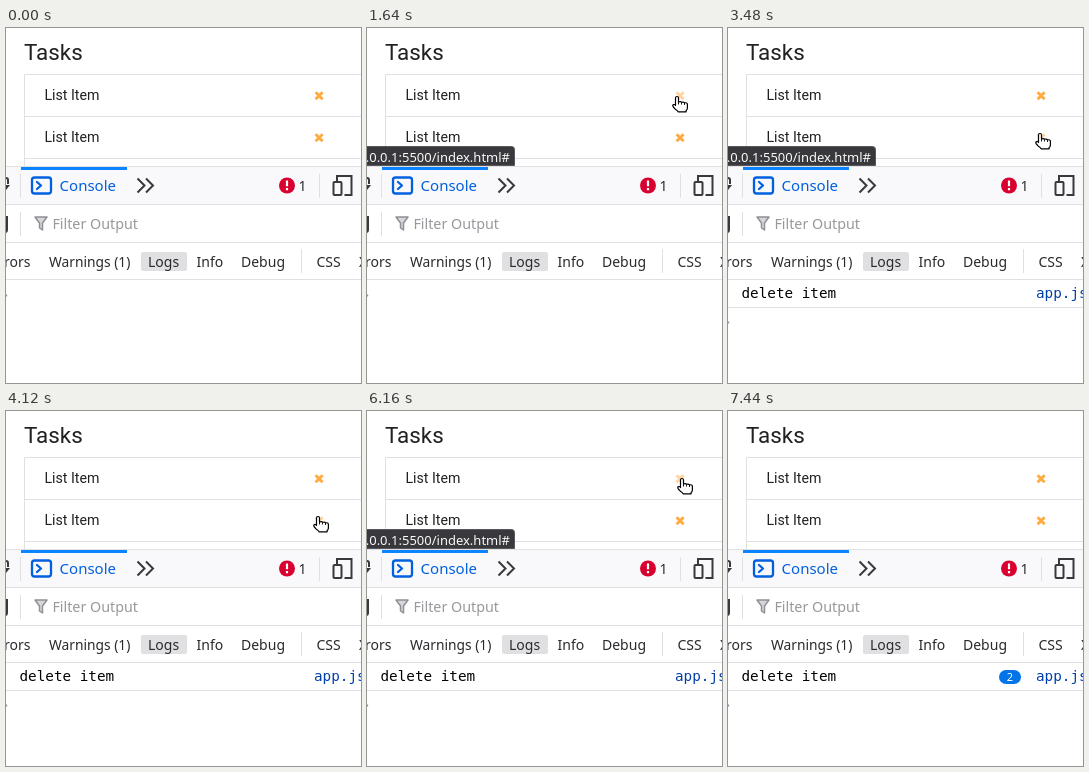
An HTML page for the animation above (7.88 s loop, 355 by 355 pixels).

```html
<!DOCTYPE html>
<html lang="en">
<head>
<meta charset="utf-8">
<title>Task list and console</title>
<style>
html, body { margin: 0; width: 100%; height: 100%; overflow: hidden; background: #fff; }
svg { display: block; width: 355px; height: 355px; }
text { white-space: pre; }
.page { font: 14.2px Roboto, sans-serif; fill: #212121; }
.ui { font: 14px "Noto Sans", sans-serif; fill: #2a2a2e; }
.mono { font: 14.3px "DejaVu Sans Mono", monospace; }
.line { stroke: #e0e0e2; fill: none; }
.icon { stroke: #38383d; stroke-width: 2; fill: none; }
.cross { stroke: #ffab40; stroke-width: 2.9; }
</style>
</head>
<body>
<svg viewBox="0 0 355 355">
  <g class="page">
    <text x="18" y="32" font-size="22.4">Tasks</text>
    <path class="line" d="M355 46.5H18.5V138M18 88.5H355M18 130.5H355"/>
    <text x="38.4" y="72">List Item</text>
    <text x="38.4" y="114">List Item</text>
    <path class="cross" d="M309.6 64.3l7 7m0-7l-7 7"/>
    <path class="cross" d="M309.6 106.3l7 7m0-7l-7 7"/>
  </g>

  <g class="ui">
    <path fill="#f9f9fb" d="M0 138H355V176H0z"/>
    <path class="line" d="M0 138.5H355M0 176.5H355M0 214.5H355M0 251.5H355M14.5 146V170M313.5 146V170M14.5 184V208M295.5 221V245"/>
    <path fill="#0a84ff" d="M15 139H121V142H15z"/>
    <path class="icon" d="M-2 150H0q2 0 2 2v4M-1 158h3l-4 5M0 189h2M1 190v12q0 2-2 2"/>
    <g stroke="#0060df" stroke-width="2.3" fill="none" stroke-linecap="round" stroke-linejoin="round">
      <rect x="26" y="149.5" width="19" height="16" rx="2.5"/>
      <path d="M31 154l4 3.5-4 3.5"/>
    </g>
    <text x="53.6" y="163" font-size="15" fill="#0060df">Console</text>
    <path class="icon" d="M131.500 150.500l7 7-7 7M140 150.500l7 7-7 7"/>
    <circle cx="281" cy="157.500" r="8" fill="#d7002f"/>
    <path stroke="#fff" stroke-width="2.2" d="M281 152.500v5.800m0 1.700v2.200"/>
    <text x="292.5" y="163">1</text>
    <path class="icon" d="M331 153v-5h14.500v19h-7"/>
    <rect class="icon" x="327.500" y="154" width="8" height="13" rx="1"/>
    <path d="M29 189h12l-4.500 6v7l-3-2v-5z" fill="#d7d7db" stroke="#8f8f96" stroke-width="1.5" stroke-linejoin="round"/>
    <text x="46.4" y="201" font-size="14.3" fill="#98989d">Filter Output</text>
    <rect x="135" y="224" width="46" height="19" rx="2" fill="#e0e0e2"/>
    <text x="24.5" y="239" text-anchor="end">Errors</text>
    <text x="42.9" y="239" font-size="13.8">Warnings (1)</text>
    <text x="142" y="239">Logs</text>
    <text x="190.5" y="239">Info</text>
    <text x="235" y="239">Debug</text>
    <text x="310.5" y="239">CSS</text>
    <text x="353" y="239">XHR</text>
  </g>

  <g id="log" class="mono">
    <text x="13.5" y="270">delete item</text>
    <text x="308" y="270" fill="#003eaa">app.js:9</text>
    <path class="line" d="M0 279.5H355"/>
  </g>
  <g id="badge">
    <rect x="271" y="259" width="22" height="14" rx="7" fill="#0074e8"/>
    <text class="ui" x="282" y="270" text-anchor="middle" style="font-size:11px;fill:#fff">2</text>
  </g>
  <path id="prompt" d="M-3 264l3.500 3.500-3.500 3.500" fill="none" stroke="#8f8f96" stroke-width="1.4"/>

  <g id="tip">
    <path d="M-1 118.500H144.500q3 0 3 3V137.500H-1z" fill="#38383d" stroke="#57575c"/>
    <text class="ui" x="143" y="133.5" text-anchor="end" style="font-size:13px;fill:#f9f9fa">127.0.0.1:5500/index.html#</text>
  </g>

  <g id="cursor" fill="#fff" stroke="#000" stroke-width="1.2" stroke-linejoin="round">
    <path id="arrow" d="M.5.5V17l3.800-3.500 2.500 5.800 2.600-1.200-2.500-5.600H12z"/>
    <g id="hand">
      <path d="M-1.500 8.500V1a1.500 1.500 0 0 1 3 0v4q2.500-.8 3 .3q2.300-.7 3 .5q2.900-.4 2.900 1.600v3.600q0 1.600-1.300 2.500v1.300h-8q-.8-1.500-2.800-2.600l-2-2.200q-1.200-1.700.2-2.400q1.200-.4 2 .9z"/>
      <path d="M1.500 5v2.500M4.500 5.500v2M7.500 6v2" stroke-width=".9"/>
    </g>
  </g>
</svg>
<script>
const LOOP = 7880, STEP = 40, FADE = 160;
const FIRST_CLICK = 2120, SECOND_CLICK = 6320;
const $ = id => document.getElementById(id);
const crosses = document.querySelectorAll(".cross");

// Pointer moves: start, end, and the place reached
const moves = [
  [320, 1000, 282, 61], [1080, 1640, 310, 69], [2960, 3480, 312, 106],
  [5000, 5320, 207, 82], [5320, 5800, 309, 68], [5800, 6160, 315, 68],
  [6400, 7080, 74, 14], [7080, 7440, 30, -20]
];
// Link hint: start of fade in, start of fade out
const hints = [[1480, 2080], [3320, 3960], [6000, 6280]];

const ramp = (t, from, to) => Math.min(1, Math.max(0, (t - from) / (to - from)));
const ease = u => (u + u * u * (3 - 2 * u)) / 2;
const show = (el, on) => el.setAttribute("visibility", on ? "visible" : "hidden");

function pointerAt(t) {
  return moves.reduce(([x, y], [from, to, toX, toY]) => {
    const u = ease(ramp(t, from, to));
    return [x + (toX - x) * u, y + (toY - y) * u];
  }, [6, 14]).map(Math.round);
}

function hintAt(t) {
  const trace = t > FIRST_CLICK && t < 3000 ? .04 : 0;
  return Math.max(trace, ...hints.map(([on, off]) =>
    ramp(t, on, on + FADE) - ramp(t, off, off + FADE)));
}

function draw(now) {
  const t = Math.floor(now % LOOP / STEP) * STEP;
  const [x, y] = pointerAt(t);
  const active = t >= 320 && t < 7440;
  let hover = false;
  crosses.forEach((el, i) => {
    const over = active && Math.abs(x - 313) < 8 && Math.abs(y - 67 - 42 * i) < 10;
    el.setAttribute("opacity", over ? .5 : 1);
    hover ||= over;
  });
  $("cursor").setAttribute("transform", `translate(${x} ${y})`);
  show($("arrow"), active && !hover);
  show($("hand"), hover);
  $("tip").setAttribute("opacity", hintAt(t));
  show($("log"), t >= FIRST_CLICK);
  show($("badge"), t >= SECOND_CLICK);
  $("prompt").setAttribute("transform", `translate(0 ${t >= FIRST_CLICK ? 27 : 0})`);
  requestAnimationFrame(draw);
}
requestAnimationFrame(draw);
</script>
</body>
</html>
```
